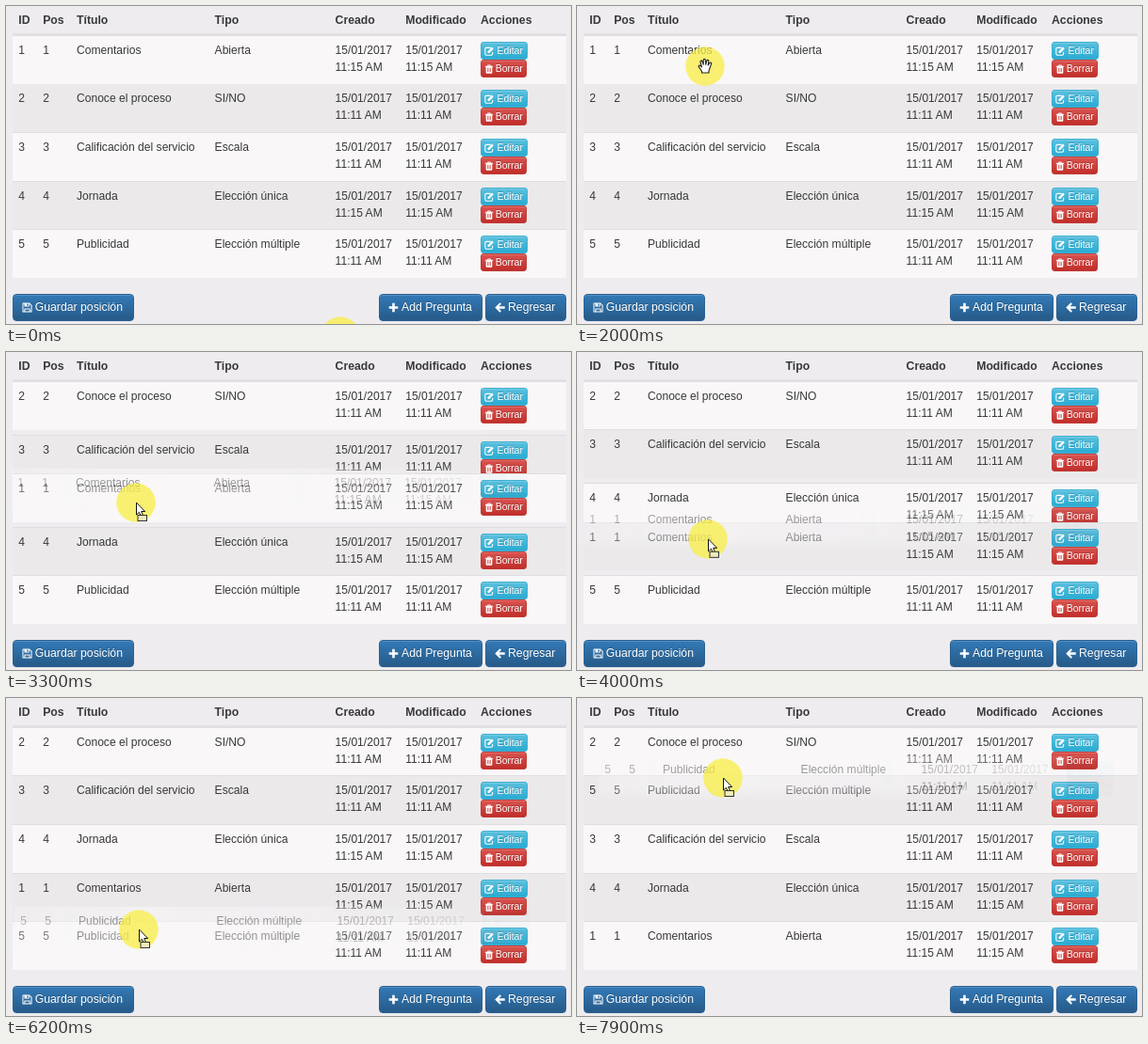
An HTML page that plays this animation: 600x338 px, repeating every 8000 ms.

```html
<!DOCTYPE html>
<html lang="es">
<head>
<meta charset="utf-8">
<title>Ordenar preguntas</title>
<style>
html, body { margin: 0; width: 100%; height: 100%; overflow: hidden; background: #eeecee; }
body { --lite: #f9f7f8; --dim: #ebe9ea; }
#stage { position: relative; width: 600px; height: 338px; overflow: hidden; background: #eeecee;
  font: 12.08px/17.5px "Liberation Sans", Arial, sans-serif; color: #38383a; }
#stage *, #pointer { box-sizing: border-box; }
.head, .row { position: absolute; left: 7px; width: 588px; }
.head { top: 0; height: 31px; border-bottom: 2px solid #e2e0e2; font-weight: bold; font-size: 12.25px; }
.row { top: 31px; height: 52px; border-top: 1px solid #dfdddf; background: var(--lite); }
.cell { position: absolute; top: 7.25px; white-space: pre; }
.head .cell { top: 6.75px; }
.btn { position: absolute; color: #fff; white-space: pre; border: 1px solid; border-radius: 3px;
  text-shadow: 0 -1px 0 rgba(0,0,0,.2); box-shadow: inset 0 1px 0 rgba(255,255,255,.15); }
.btn svg { position: absolute; fill: #fff; }
.btn b { position: absolute; font-weight: normal; }
.small { left: 496.5px; height: 18.5px; font-size: 10.5px; line-height: 17px; }
.small svg { left: 3.5px; top: 3.5px; width: 10px; height: 10px; }
.edit { top: 6px; width: 50px; background: linear-gradient(#5bc0de, #2aabd2); border-color: #3fb0d2; }
.edit b { left: 17px; }
.drop { top: 25px; width: 49.5px; background: linear-gradient(#d9534f, #c12e2a); border-color: #c23c38; }
.drop b { left: 15.2px; }
.big { top: 306px; height: 28.5px; font-size: 12.25px; line-height: 27px; border-radius: 4px;
  background: linear-gradient(#337ab7, #265a88); border-color: #2c6293; }
.big svg { top: 8px; width: 11px; height: 11px; }

.row, #pointer, .hand, .arrow, .badge, .ghost { animation: 8s step-end infinite; }
#r1 { animation-name: r1; z-index: 2; }
#r2 { animation-name: r2; }
#r3 { animation-name: r3; }
#r4 { animation-name: r4; }
#r5 { animation-name: r5; z-index: 3; }
@keyframes r1 {
  0% { transform: none; background: var(--lite); }
  36.25% { transform: translateY(46px); background: var(--dim); }
  37.5% { transform: translateY(51px); background: var(--dim); }
  41.25% { transform: translateY(98px); background: var(--lite); }
  42.5% { transform: translateY(103px); background: var(--lite); }
  50% { transform: translateY(150px); background: var(--dim); }
  51.25% { transform: translateY(155px); background: var(--dim); }
  82.5% { transform: translateY(203px); background: var(--lite); }
  83.75%, 100% { transform: translateY(206px); background: var(--lite); }
}
@keyframes r2 {
  0% { transform: translateY(51px); background: var(--dim); }
  36.25% { transform: translateY(5px); background: var(--lite); }
  37.5%, 100% { transform: none; background: var(--lite); }
}
@keyframes r3 {
  0% { transform: translateY(103px); background: var(--lite); }
  41.25% { transform: translateY(57px); background: var(--dim); }
  42.5% { transform: translateY(51px); background: var(--dim); }
  91.25% { transform: translateY(100px); background: var(--lite); }
  92.5%, 100% { transform: translateY(103px); background: var(--lite); }
}
@keyframes r4 {
  0% { transform: translateY(155px); background: var(--dim); }
  50% { transform: translateY(108px); background: var(--lite); }
  51.25% { transform: translateY(103px); background: var(--lite); }
  87.5% { transform: translateY(153px); background: var(--dim); }
  88.75%, 100% { transform: translateY(155px); background: var(--dim); }
}
@keyframes r5 {
  0% { transform: translateY(206px); background: var(--lite); }
  82.5% { transform: translateY(158px); background: var(--dim); }
  83.75% { transform: translateY(155px); background: var(--dim); }
  87.5% { transform: translateY(106px); background: var(--lite); }
  88.75% { transform: translateY(103px); background: var(--lite); }
  91.25% { transform: translateY(54px); background: var(--dim); }
  92.5%, 100% { transform: translateY(51px); background: var(--dim); }
}

#pointer { position: absolute; left: 0; top: 0; width: 0; height: 0; z-index: 5; animation-name: travel; }
#pointer > svg { position: absolute; left: -24px; top: -24px; width: 48px; height: 48px; }
@keyframes travel {
  0% { transform: translate(355px, 351px); animation-timing-function: steps(9); }
  11.25% { transform: translate(239px, 210px); animation-timing-function: steps(10); }
  23.75% { transform: translate(136px, 64px); }
  32.5% { transform: translate(138px, 69px); animation-timing-function: steps(6); }
  40% { transform: translate(138px, 129px); }
  41.25% { transform: translate(138px, 160px); animation-timing-function: steps(3); }
  45% { transform: translate(139px, 176px); }
  46.25% { transform: translate(139px, 176px); animation-timing-function: steps(5); }
  52.5% { transform: translate(139px, 214px); }
  57.5% { transform: translate(139px, 214px); animation-timing-function: steps(4); }
  62.5% { transform: translate(139px, 251px); }
  65% { transform: translate(139px, 251px); animation-timing-function: steps(3); }
  68.75% { transform: translate(139px, 264px); }
  71.25% { transform: translate(139px, 264px); animation-timing-function: steps(5); }
  77.5% { transform: translate(141px, 246px); }
  80% { transform: translate(142px, 236px); }
  82.5% { transform: translate(143px, 212px); }
  83.75% { transform: translate(144px, 190px); }
  87.5% { transform: translate(147px, 152px); }
  88.75% { transform: translate(148px, 141px); }
  91.25% { transform: translate(150px, 115px); }
  92.5% { transform: translate(150px, 115px); animation-timing-function: steps(5); }
  98.75%, 100% { transform: translate(155px, 85px); }
}
.hand { animation-name: hand; }
.arrow { animation-name: arrow; }
.badge { animation-name: badge; }
@keyframes hand { 0%, 33.75%, 72.5%, 100% { opacity: 0; } 3.75%, 57.5% { opacity: 1; } }
@keyframes arrow { 0%, 33.75%, 72.5%, 100% { opacity: 1; } 3.75%, 57.5% { opacity: 0; } }
@keyframes badge { 0%, 57.5% { opacity: 0; } 33.75%, 72.5%, 100% { opacity: 1; } }

.ghost { position: absolute; left: -132px; width: 588px; height: 52px;
  -webkit-mask: linear-gradient(#000 65%, transparent 97%); mask: linear-gradient(#000 65%, transparent 97%); }
.ghost .row { left: 0; top: 0; border: 0;
  --fade: linear-gradient(90deg, rgba(0,0,0,.32), rgba(0,0,0,.55) 130px, rgba(0,0,0,.45) 290px, rgba(0,0,0,.26) 410px, rgba(0,0,0,.05) 500px, transparent);
  -webkit-mask: var(--fade); mask: var(--fade); }
#g1 { top: -36px; animation-name: drag1; }
#g5 { top: -24px; animation-name: drag2; }
@keyframes drag1 { 0%, 57.5%, 100% { opacity: 0; } 33.75% { opacity: 1; } }
@keyframes drag2 { 0% { opacity: 0; } 72.5%, 100% { opacity: 1; } }
</style>
</head>
<body>
<svg width="0" height="0" style="position:absolute">
  <symbol id="pencil" viewBox="0 0 12 12">
    <path d="M8 1.6H2.6Q1 1.6 1 3.2V9.4Q1 11 2.6 11H8.8Q10.4 11 10.4 9.4V7" fill="none" stroke="#fff" stroke-width="1.3"/>
    <path d="M4.3 8.3V6.2L9.7.7L11.8 2.8L6.4 8.3Z"/>
  </symbol>
  <symbol id="trash" viewBox="0 0 12 12">
    <path fill-rule="evenodd" d="M1 2.2H3.6L4.3.7H7.7L8.4 2.2H11V3.4H10V10.5Q10 11.7 8.9 11.7H3.1Q2 11.7 2 10.5V3.4H1ZM5 2.2H7L6.7 1.6H5.3ZM3.6 4.6V9.9H4.4V4.6ZM5.6 4.6V9.9H6.4V4.6ZM7.6 4.6V9.9H8.4V4.6Z"/>
  </symbol>
  <symbol id="disk" viewBox="0 0 12 12">
    <path fill-rule="evenodd" d="M.5 1.2Q.5.5 1.2.5H8.7L11.5 3.3V10.8Q11.5 11.5 10.8 11.5H1.2Q.5 11.5.5 10.8ZM1.6 1.6V10.4H2.6V7H9.4V10.4H10.4V3.8L8.5 1.7V5H2.7V1.6ZM5.7 1.6V4H7.3V1.6ZM3.7 8.1V10.4H8.3V8.1Z"/>
  </symbol>
  <symbol id="plus" viewBox="0 0 12 12"><path d="M4.6.8H7.4V4.6H11.2V7.4H7.4V11.2H4.6V7.4H.8V4.6H4.6Z"/></symbol>
  <symbol id="back" viewBox="0 0 12 12"><path d="M6 .4L7.6 2L5 4.7H11.7V7.3H5L7.6 10L6 11.6L.3 6Z"/></symbol>
</svg>
<div id="stage">
  <div id="pointer">
    <svg viewBox="-24 -24 48 48">
      <circle r="20.7" fill="#f8ee45" fill-opacity=".75"/>
      <path class="hand" fill="#fff" stroke="#222" stroke-width="1.1" stroke-linejoin="round"
        d="M-3.5 7V5.2L-6.6.9C-7.4-.6-5.8-1.5-4.8-.4L-3.5 1L-5-4.4C-5.2-6.1-3.5-6.4-3-5L-1.8-1.7V-6.5C-1.7-8 .2-8 .4-6.5L.7-1.7L1.8-5.8C2.3-7.2 4-6.8 3.8-5.2L3.2-1L4.8-3.4C5.8-4.6 7.1-3.7 6.6-2.4L4.8 2.8L4 5.2V7Z"/>
      <path class="arrow" fill="#fff" stroke="#111" d="M.5 0V13L3.5 10.3L5.7 15.3L7.8 14.4L5.7 9.5H9.7Z"/>
      <rect class="badge" x="2" y="13.5" width="9.5" height="6" fill="#efebb8" stroke="#333"/>
    </svg>
  </div>
</div>
<script>
const stage = document.getElementById('stage');
const pointer = document.getElementById('pointer');
const lefts = [6.3, 32.2, 68, 214.6, 342.6, 417.2, 497];
const questions = [
  ['Comentarios', 'Abierta', '11:15 AM'],
  ['Conoce el proceso', 'SI/NO', '11:11 AM'],
  ['Calificación del servicio', 'Escala', '11:11 AM'],
  ['Jornada', 'Elección única', '11:15 AM'],
  ['Publicidad', 'Elección múltiple', '11:11 AM']
];

const cells = list => list.map((text, i) =>
  `<span class="cell" style="left:${lefts[i]}px">${text}</span>`).join('');
const icon = (name, x) => `<svg${x ? ` style="left:${x}px"` : ''}><use href="#${name}"/></svg>`;

function row(n) {
  const [title, type, hour] = questions[n - 1];
  const date = '15/01/2017\n' + hour;
  return cells([n, n, title, type, date, date]) +
    `<div class="btn small edit">${icon('pencil')}<b>Editar</b></div>` +
    `<div class="btn small drop">${icon('trash')}<b>Borrar</b></div>`;
}

function big(x, width, name, iconX, text, textX) {
  return `<div class="btn big" style="left:${x}px;width:${width}px">` +
    `${icon(name, iconX)}<b style="left:${textX}px">${text}</b></div>`;
}

stage.insertAdjacentHTML('afterbegin',
  `<div class="head">${cells(['ID', 'Pos', 'Título', 'Tipo', 'Creado', 'Modificado', 'Acciones'])}</div>` +
  questions.map((q, i) => `<div class="row" id="r${i + 1}">${row(i + 1)}</div>`).join('') +
  big(6.5, 129, 'disk', 9, 'Guardar posición', 23.2) +
  big(396, 109.5, 'plus', 8.5, 'Add Pregunta', 23) +
  big(508.5, 86.5, 'back', 9.5, 'Regresar', 23.5));

pointer.insertAdjacentHTML('afterbegin', [1, 5].map(n =>
  `<div class="ghost" id="g${n}"><div class="row">${row(n)}</div></div>`).join(''));
</script>
</body>
</html>
```
